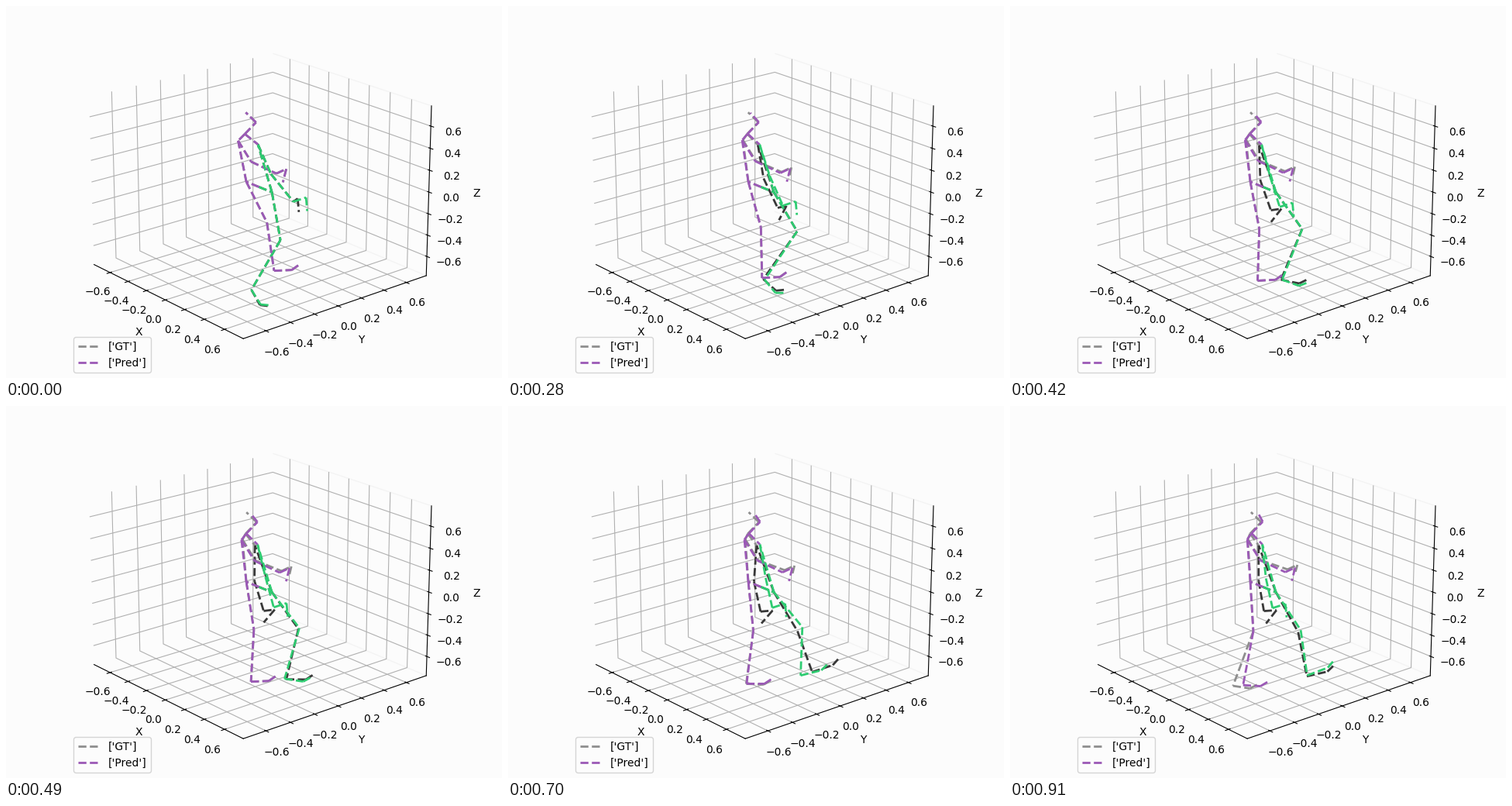
A matplotlib script for the animation above (0.98 s loop, 640x480 px).

```python
import numpy as np
import matplotlib.pyplot as plt
from matplotlib.animation import FuncAnimation

STEPS = 14
BG = "#fcfcfc"

# Bone lengths: (thigh, shin, foot, toe) and (upper arm, forearm, thumb, hand)
LEG = dict(l=(0.475, 0.492, 0.165, 0.075), r=(0.475, 0.456, 0.185, 0.075))
ARM = dict(l=(0.25, 0.28, 0.088, 0.12), r=(0.322, 0.295, 0.11, 0.13))
SIDE = dict(l=-1, r=1)

# Each value is a constant or a few evenly spaced keys over the loop.
# Angles are in degrees, forward from straight down; rolls lean sideways.
TRUTH = dict(
    lean=(-0.093, -0.083), yaw=(0, 0.03, 0.038), tilt=0,
    r_thigh=(9, 23, 29, 25.7, 24), l_thigh=(22, 8.5, 3),
    r_shin=(-33, -43, -38, -18.5, 5.5, 20.5, 10),
    l_shin=(7.5, 2.2, -2.4, -6.5, -21),
    r_foot=(23, 30, 65, 90, 84), l_foot=(73, 73, 62),
    r_upper=(20, 11, 0.5, -4, 0), l_upper=26,
    r_fore=(24, 12.5, 8.7), l_fore=(51, 56),
    r_thumb=76, l_thumb=101,
    r_hand=(5, -45, -43), l_hand=(-14, 8, 20),
    thumb_roll=(-33, -8, 0), hand_roll=(0, -20, -30),
)
GUESS = dict(
    lean=(-0.093, -0.07), yaw=(0, 0.015, 0.02), tilt=(0, 23),
    r_thigh=(9, 23, 29.5, 31.5, 27), l_thigh=(22, 8.5, 3),
    r_shin=(-33, -41, -19, -2.5, 7.5), l_shin=(7.5, -2.4, -10.5),
    r_foot=(25, 25, 58, 84, 93), l_foot=(73, 73, 67),
    r_upper=(20, 12.5, 5.5), l_upper=26,
    r_fore=(24, 11, 11), l_fore=51,
    r_thumb=92, l_thumb=101,
    r_hand=5, l_hand=-14,
    thumb_roll=0, hand_roll=0,
)

# Chains of joints; True marks the left-side colour
CHAINS = [
    ("r_hip r_knee r_ankle r_ball r_toe", False),
    ("l_hip l_knee l_ankle l_ball l_toe", True),
    ("pelvis r_hip", False),
    ("pelvis l_hip", True),
    ("l_hip l_shoulder l_elbow l_wrist l_thumb l_tip", True),
    ("r_hip r_shoulder r_elbow r_wrist r_thumb r_tip", False),
    ("neck r_shoulder", True),
    ("neck l_shoulder", True),
    ("neck head crown", True),
]


def curve(keys, u):
    """Smooth value at u in 0..1 through evenly spaced keys."""
    if np.isscalar(keys):
        return keys
    p = np.array(keys, float)
    m = np.gradient(p)
    x = u * (len(p) - 1)
    i = min(int(x), len(p) - 2)
    s = x - i
    return ((1 + 2 * s) * (1 - s) ** 2 * p[i] + s * (1 - s) ** 2 * m[i]
            + s * s * (3 - 2 * s) * p[i + 1] + s * s * (s - 1) * m[i + 1])


def bone(length, angle, roll=0):
    """Vector of a bone swung forward along Y and leaned along X."""
    a, r = np.radians([angle, roll])
    return length * np.array([np.sin(r), np.cos(r) * np.sin(a),
                              -np.cos(r) * np.cos(a)])


def solve(motion, u):
    """All joint positions at time u, found from the pelvis outwards."""
    v = {name: curve(keys, u) for name, keys in motion.items()}
    chest = np.array([0, v["lean"], 0.435])
    at = dict(pelvis=np.zeros(3), neck=chest + (0, -0.026, 0.085))
    at["head"] = at["neck"] + bone(0.122, 130)
    at["crown"] = at["head"] + bone(0.142, 217, v["tilt"])

    def chain(side, start, joints, bones):
        point = at[f"{side}_{start}"]
        for joint, vector in zip(joints.split(), bones):
            point = at[f"{side}_{joint}"] = point + vector

    for side, sign in SIDE.items():
        at[side + "_hip"] = np.array([sign * 0.13, 0, 0])
        at[side + "_shoulder"] = chest + sign * np.array([0.1, -v["yaw"], 0.018])
        foot = v[side + "_foot"]
        legs = [v[side + "_thigh"], v[side + "_shin"], foot, foot + 40]
        chain(side, "hip", "knee ankle ball toe", map(bone, LEG[side], legs))

        arms = [v[f"{side}_{part}"] for part in ("upper", "fore", "thumb", "hand")]
        if side == "r":
            rolls = [0, 18 * (1 - u) ** 2, v["thumb_roll"], 0]
        else:
            rolls = [0, 0, 0, v["hand_roll"]]
        chain(side, "shoulder", "elbow wrist thumb tip",
              map(bone, ARM[side], arms, rolls))
    return at


fig = plt.figure(figsize=(6.4, 4.8), dpi=100, facecolor=BG)
ax = fig.add_axes([0, 0, 1, 1], projection="3d", facecolor=BG)
ax.view_init(elev=20, azim=-40)


class Skeleton:
    def __init__(self, name, motion, left, right):
        self.motion = motion
        self.bones = []
        for names, is_left in CHAINS:
            joints = names.split()
            for a, b in zip(joints, joints[1:]):
                line, = ax.plot([], [], [], "--", lw=2,
                                color=left if is_left else right)
                self.bones.append((a, b, line))
        self.key, = ax.plot([], [], [], "--", lw=2, color=left,
                            label=f"['{name}']")

    def pose(self, u):
        at = solve(self.motion, u)
        for a, b, line in self.bones:
            line.set_data_3d(*zip(at[a], at[b]))


people = [
    Skeleton("GT", TRUTH, "#8e8e8e", "#383838"),
    Skeleton("Pred", GUESS, "#9b59b6", "#2ecc71"),
]

lim = 0.75 * 25 / 24
ax.set(xlim=(-lim, lim), ylim=(-lim, lim), zlim=(-lim, lim),
       xlabel="X", ylabel="Y", zlabel="Z")
for axis in (ax.xaxis, ax.yaxis, ax.zaxis):
    axis.set_ticks(np.arange(-3, 4) / 5)
    axis.pane.set_facecolor("none")
    axis.pane.set_edgecolor("none")
ax.yaxis.pane.set_edgecolor("#ececec")
ax.legend(handles=[p.key for p in people], loc="lower left", facecolor=BG)


def draw(step):
    for person in people:
        person.pose(step / (STEPS - 1))
    return []


anim = FuncAnimation(fig, draw, frames=STEPS, interval=70, repeat=True,
                     init_func=lambda: draw(0))
plt.show()
```
